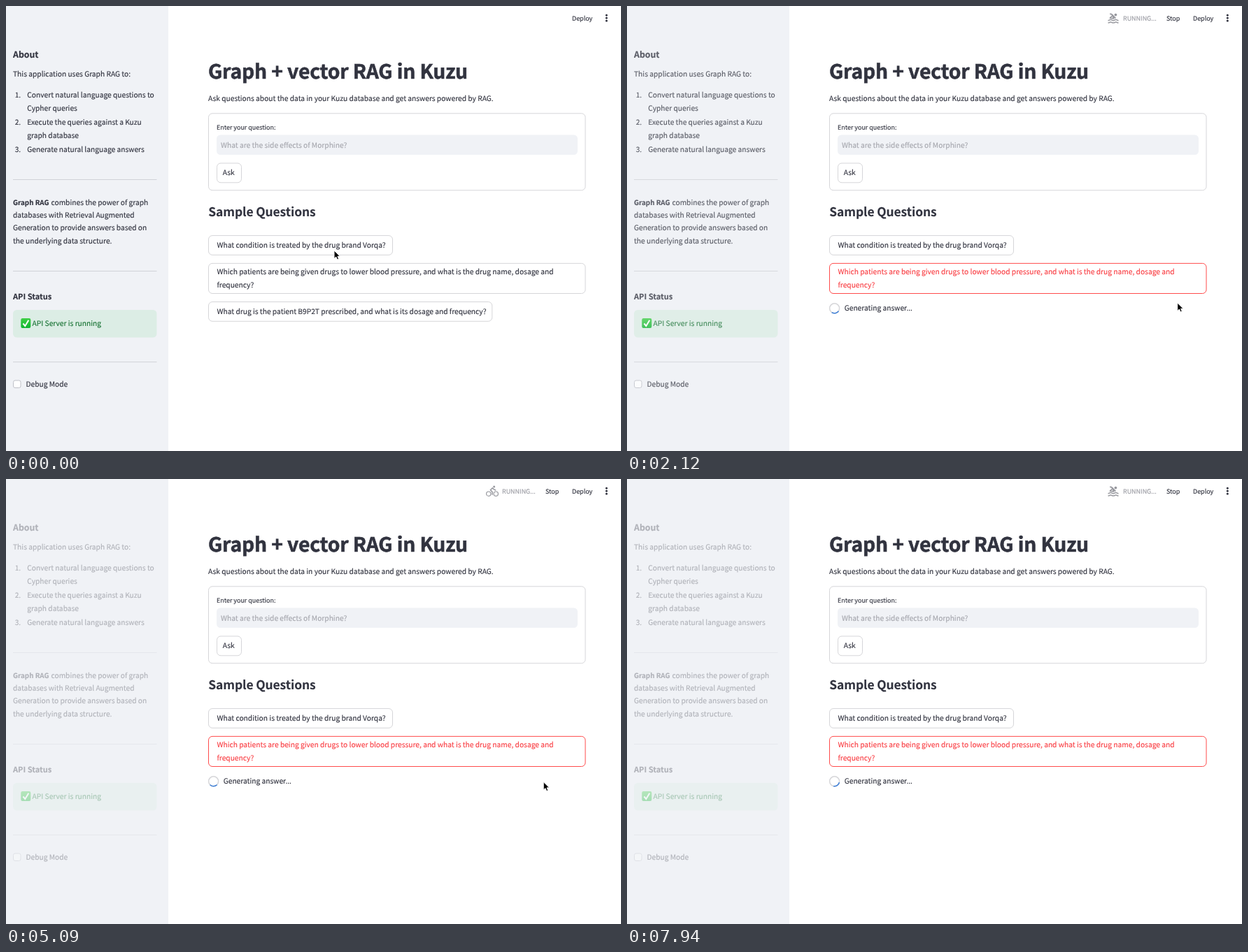
Animation, 879 px wide and 637 px high, one loop 8000 ms. Source, as an HTML page:

```html
<!DOCTYPE html>
<html lang="en">
<head>
<meta charset="utf-8">
<title>Graph RAG demo</title>
<style>
  html, body { margin: 0; width: 100%; height: 100%; overflow: hidden; background: #fff; }
  svg { display: block; width: 100vw; height: 100vh; }
  text {
    font: 400 10.22px "Noto Sans CJK JP", "Noto Sans CJK SC", "Noto Sans CJK", "Open Sans", sans-serif;
    color: #31333f; fill: currentColor; stroke: currentColor; stroke-width: .14px;
    text-rendering: geometricPrecision; white-space: pre;
  }
  .bold { font-weight: 700; }
  .title { font-size: 28.25px; letter-spacing: -.005em; stroke-width: .6px; }
  .small { font-size: 8.95px; }
  .box { fill: #fff; stroke: #d6d6d9; }
  .rule { stroke: #d0d2d8; }
  .line { fill: none; stroke: #97989e; stroke-width: 2; stroke-linejoin: round; }
  .hot rect { stroke: #ff4b4b; }
  .hot text { color: #f93f44; }
</style>
</head>
<body>
<svg viewBox="0 0 879 637" preserveAspectRatio="none">
  <defs>
    <linearGradient id="leaf" x2="0" y2="1">
      <stop offset="0" stop-color="#3fcf46"/><stop offset="1" stop-color="#10b531"/>
    </linearGradient>
  </defs>
  <rect width="879" height="637" fill="#fff"/>
  <rect width="232" height="637" fill="#f0f2f6"/>
  <g id="side"></g>
  <g id="main"></g>

  <g id="busy">
    <g id="icons" fill="#97989e">
      <g transform="translate(686 8.4) scale(.75)">
        <circle cx="15.5" cy="3.5" r="2"/>
        <g class="line">
          <circle cx="5" cy="17" r="4.2" stroke-width="1.6"/>
          <circle cx="19" cy="17" r="4.2" stroke-width="1.6"/>
          <path d="M12 19V13.3L8.4 9.8L12.4 6L14.6 8.2Q16.3 10 19.1 10"/>
        </g>
      </g>
      <g transform="translate(686 8.4) scale(.75)">
        <circle cx="16.5" cy="5.5" r="2.5"/>
        <g class="line">
          <path d="M5.5 4.1Q8.4 4 9.8 5.4L16.5 12.2M10.6 6.8L5.8 11.8L13 12.6Z" stroke-width="2.3"/>
          <path id="wave" d="M2 16.3q1.7 0 3.3-1t3.4 0t3.3 1t3.3-1t3.4 0t3.3 1"/>
          <use href="#wave" y="4.6"/>
        </g>
      </g>
      <g transform="translate(686 8.4) scale(.75)">
        <circle cx="16" cy="4.5" r="2"/>
        <g class="line">
          <path d="M8.4 9.4L10.4 6.9L14.4 8.6L11.7 13.6H16.8L18 19.5" stroke-width="2.3"/>
          <path d="M8.8 13.2A4 4 0 1 0 14.2 18.6"/>
        </g>
      </g>
    </g>
    <text class="small" x="709" y="20.7" style="color:#9b9ca3">RUNNING...</text>
    <text class="small" x="771" y="20.7">Stop</text>
    <circle cx="296.6" cy="432.8" r="7" fill="none" stroke="#d6d6d9" stroke-width="1.5"/>
    <path id="arc" d="M-4.95-4.95A7 7 0 0 1 4.95-4.95" fill="none" stroke="#3f80d8" stroke-width="1.5"/>
    <text x="310.7" y="436.3">Generating answer...</text>
  </g>

  <g id="cursor" stroke="#fff" stroke-width="1" stroke-linejoin="round">
    <path id="arrow" d="M0 0V11.6L2.7 9.1L4.5 13.1L6.6 12.2L4.9 8.3H8.4Z"/>
    <path id="hand" d="M-1.4 1.2Q-1.2-.2 0 0Q1 .1 1.2 1.1L1.9 4.2Q3.2 3.4 4 4.5Q5.3 3.9 6 5.1Q7.6 4.8 7.8 6.4V8.6Q7.7 10.2 6.7 11.2V12.6H.8L-3.2 8.4Q-3.7 7.1-2.4 6.8L-.4 7.8Z"/>
  </g>
</svg>
<script>
const LOOP = 8000, HOVER = 850, RUN = 1390;
const FADE = { start: 1600, length: 1000, low: 0.33 };
const SPIN = { period: 980, phase: 110 };
const SPORT = { period: 1160, start: 5055 };
const EXIT = 5935;

// time, x, y of the pointer tip
const TRACK = [
  [180, 469, 350], [350, 472, 345], [620, 472, 345], [930, 471, 379.5],
  [1400, 471, 379.5], [2060, 786.7, 425], [2460, 786.7, 425],
  [3180, 766.5, 435.5], [4200, 766.5, 435.5], [4950, 768.2, 433.6],
  [5180, 768.2, 433.6], [5890, 870, 481]
];

const $ = id => document.getElementById(id);

function add(parent, name, attrs, content = '') {
  const el = document.createElementNS('http://www.w3.org/2000/svg', name);
  for (const key in attrs) el.setAttribute(key, attrs[key]);
  el.textContent = content;
  parent.append(el);
  return el;
}

function label(parent, x, y, content, cls = '', style = '') {
  return add(parent, 'text', { x, y, class: cls, style }, content);
}

function box(parent, x, y, width, height, cls = 'box', rx = 5.5) {
  return add(parent, 'rect', { x, y, width, height, rx, class: cls });
}

// Lines are centred vertically inside the button.
function button(x, y, width, height, lines) {
  const g = add($('main'), 'g', {});
  const first = y + height / 2 + 3.5 - 9.1 * (lines.length - 1);
  box(g, x, y, width, height);
  lines.forEach((line, i) => label(g, 301.5, first + i * 18.2, line));
  return g;
}

function buildSide() {
  const side = $('side');
  label(side, 10, 73.6, 'About', 'bold', 'font-size:12.3px');
  label(side, 10, 101.3, 'This application uses Graph RAG to:');
  [131.3, 170.3, 209].forEach((y, i) => label(side, 12.7, y, `${i + 1}.`));
  label(side, 30.3, 131.3, 'Convert natural language questions to');
  label(side, 30.3, 149.5, 'Cypher queries');
  label(side, 30.3, 170.3, 'Execute the queries against a Kuzu');
  label(side, 30.3, 188.5, 'graph database');
  label(side, 30.3, 209, 'Generate natural language answers');
  for (const y of [248.5, 379.5, 509.6]) {
    add(side, 'line', { x1: 10, x2: 215.5, y1: y, y2: y, class: 'rule' });
  }
  label(side, 10, 285, 'Graph RAG', 'bold', 'font-size:9.85px');
  label(side, 64.5, 285, 'combines the power of graph');
  ['databases with Retrieval Augmented', 'Generation to provide answers based on', 'the underlying data structure.']
    .forEach((line, i) => label(side, 10, 303.2 + i * 18.2, line));
  label(side, 10, 420, 'API Status', 'bold', 'font-size:11.1px');
  add(side, 'rect', { x: 10, y: 435, width: 205.5, height: 39.5, rx: 5.5, fill: '#dcede5' });
  add(side, 'rect', { x: 21.3, y: 447, width: 14, height: 14, rx: 2.2, fill: 'url(#leaf)' });
  add(side, 'path', { d: 'M24.4 454.5L27.3 458L32.3 449.8', fill: 'none', stroke: '#fff', 'stroke-width': 2 });
  label(side, 37.6, 458, 'API Server is running', '', 'color:#177233');
  add(side, 'rect', { x: 10.5, y: 536, width: 10.5, height: 10.5, rx: 2.5, fill: '#fff', stroke: '#bfc1c8' });
  label(side, 28.5, 544.5, 'Debug Mode');
}

function buildMain() {
  const main = $('main');
  label(main, 809, 20.7, 'Deploy', 'small');
  for (const cy of [13.2, 17.2, 21.2]) add(main, 'circle', { cx: 858.3, cy, r: 1.45, fill: '#31333f' });
  label(main, 289, 104, 'Graph + vector RAG in Kuzu', 'bold title');
  label(main, 289, 136.2, 'Ask questions about the data in your Kuzu database and get answers powered by RAG.');
  box(main, 289.5, 153.8, 538.5, 110);
  label(main, 301, 176.7, 'Enter your question:', 'small');
  add(main, 'rect', { x: 301, y: 184.5, width: 516, height: 28.5, rx: 5.5, fill: '#f0f2f6' });
  label(main, 307, 202.7, 'What are the side effects of Morphine?', '', 'color:#a5a6ad');
  box(main, 301.5, 225, 35, 27.8);
  label(main, 309.7, 242.3, 'Ask');
  label(main, 289.3, 300.5, 'Sample Questions', 'bold', 'font-size:17.4px;letter-spacing:-.005em');
  button(289.5, 328.6, 263, 27.8, ['What condition is treated by the drug brand Vorqa?']);
  const second = button(289.5, 368.4, 538.5, 43.1, [
    'Which patients are being given drugs to lower blood pressure, and what is the drug name, dosage and',
    'frequency?'
  ]);
  const third = button(289.5, 423.5, 405.3, 27.8,
    ['What drug is the patient B9P2T prescribed, and what is its dosage and frequency?']);
  return { second, third };
}

function pointer(t) {
  const i = TRACK.findIndex(p => p[0] > t);
  if (i === 0) return TRACK[0].slice(1);
  if (i < 0) return TRACK[TRACK.length - 1].slice(1);
  const [t0, x0, y0] = TRACK[i - 1], [t1, x1, y1] = TRACK[i];
  const u = (t - t0) / (t1 - t0), k = u * u * (3 - 2 * u);
  return [x0 + (x1 - x0) * k, y0 + (y1 - y0) * k];
}

const show = (el, on) => { el.style.display = on ? '' : 'none'; };
const mod = (a, n) => ((a % n) + n) % n;

buildSide();
const { second, third } = buildMain();
const sports = [...$('icons').children];

function render(t) {
  const running = t >= RUN;
  show($('busy'), running);
  show(third, !running);
  second.setAttribute('class', t >= HOVER ? 'hot' : '');

  const u = Math.min(1, Math.max(0, (t - FADE.start) / FADE.length));
  $('side').setAttribute('opacity', 1 - (1 - FADE.low) * u ** 1.7);

  const turn = 360 * t / SPIN.period + SPIN.phase;
  $('arc').setAttribute('transform', `translate(296.6 432.8) rotate(${turn})`);
  const sport = Math.floor(mod(t - SPORT.start, SPORT.period) / SPORT.period * sports.length);
  sports.forEach((el, i) => show(el, i === sport));

  const [x, y] = pointer(t);
  const over = t >= HOVER && y < 412;
  $('cursor').setAttribute('transform', `translate(${x} ${y})`);
  show($('cursor'), t < EXIT);
  show($('hand'), over);
  show($('arrow'), !over);
}

const began = performance.now();
function tick() {
  render((performance.now() - began) % LOOP);
  requestAnimationFrame(tick);
}
tick();
</script>
</body>
</html>
```
